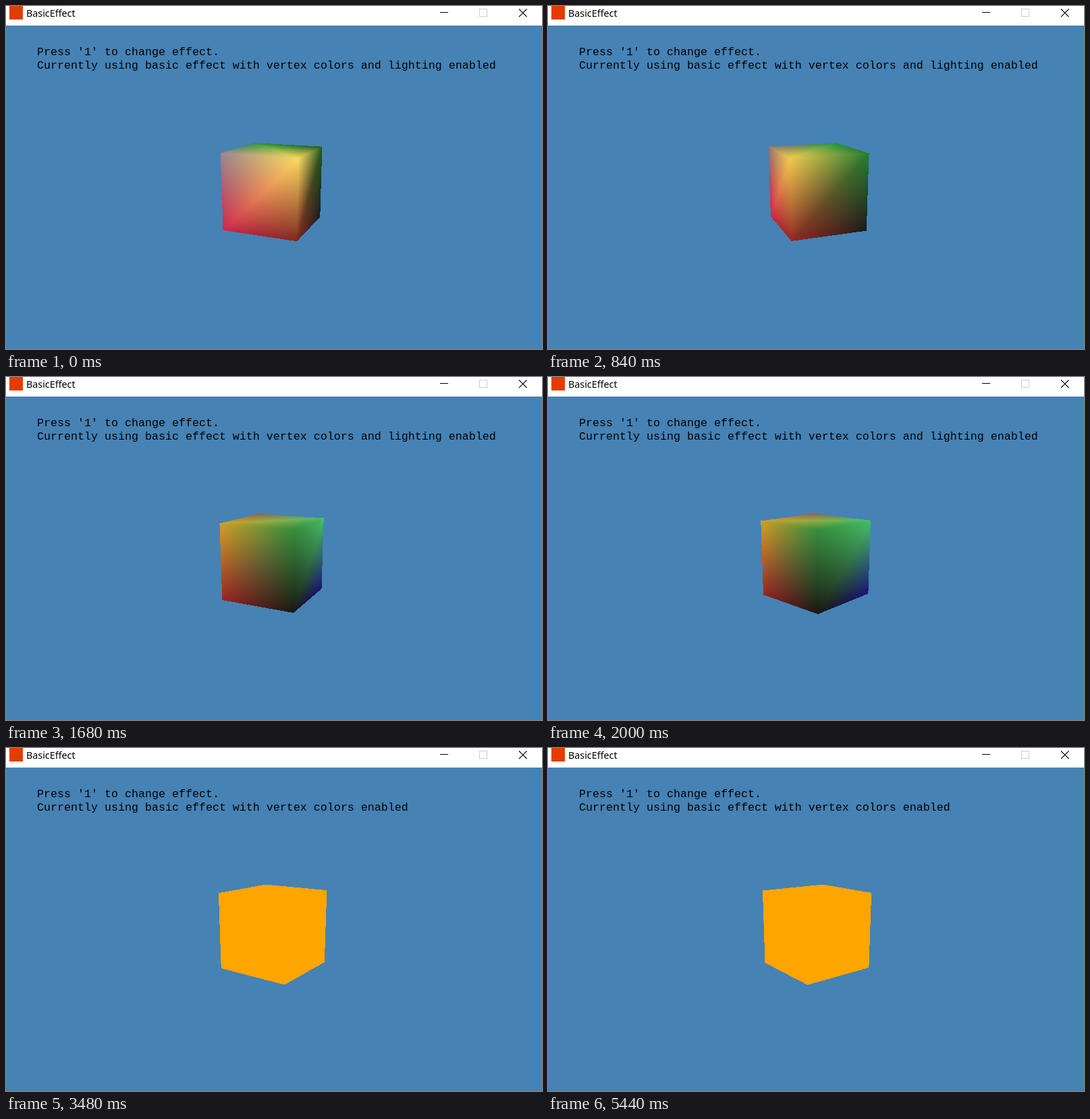
An HTML page with a canvas that plays this animation: 794 by 509 pixels, repeating every 5.52 s.

```html
<!DOCTYPE html>
<html lang="en">
<head>
<meta charset="utf-8">
<title>BasicEffect</title>
<style>
  html, body { margin: 0; width: 100%; height: 100%; overflow: hidden; background: #4682b4; }
  canvas, svg { position: absolute; left: 0; top: 0; display: block; }
  .title { font: 14.3px "Segoe UI", "Open Sans", "Noto Sans", sans-serif; }
  .hud { font: 16.67px "Courier New", "Liberation Mono", monospace; white-space: pre; }
</style>
</head>
<body>
<canvas id="scene" width="794" height="509"></canvas>
<svg width="794" height="509" viewBox="0 0 794 509">
  <rect width="794" height="29" fill="#fff"/>
  <rect x="5" y="0" width="20" height="20" fill="#e43c00"/>
  <text class="title" x="30" y="16">BasicEffect</text>
  <g fill="none" stroke="#000">
    <path d="M643 9.5h12"/>
    <rect x="701.5" y="4.5" width="11" height="11" stroke="#ccc"/>
    <path d="M760 4.500l11.500 11.500M771.500 4.500l-11.500 11.500" stroke-width="1.1"/>
  </g>
  <text class="hud" x="46" y="73">Press '1' to change effect.</text>
  <text class="hud" x="46" y="93" id="status"></text>
</svg>
<script>
const LOOP = 5520, STEPS = 71, UNLIT_STEP = 27;
const BACKGROUND = [70, 130, 180], ORANGE = [255, 165, 0];
const BOX = { x: 308, y: 198, w: 178, h: 158 };

// Camera at (0, 2.5, 10) looking at the origin, 45 degree field of view.
const DIST = Math.hypot(2.5, 10), SIN = 2.5 / DIST, COS = 10 / DIST;
const FOCAL = 240 / Math.tan(Math.PI / 8), CX = 397, CY = 269;

const ctx = document.getElementById('scene').getContext('2d');
const image = ctx.createImageData(BOX.w, BOX.h);
const status = document.getElementById('status');

// Heading of the first corner, in degrees, by step.
const HEADING = [[0, 22.65], [7, -7.6], [16, -45.4], [22, -71], [32, -114.2], [45, -170], [70, -278.1]];

// Lit corner colours at LIGHT_STEPS; four top corners, then four bottom ones.
const LIGHT_STEPS = [0, 7, 16, 22];
const LIT = [
  'fad75f ffda5f dab43a d2a028', '1e5a1e 236a23 28963e 378c3c',
  '23963c 1e963c 1e963c 46be69', '968790 968284 96645a 965f46',
  '7d2820 87261e 9b2d28 9b2423', '1c1c1c 1a1a18 1e1816 191812',
  '14106e 14106e 14106e 191478', 'cd284b d72346 c82346 be2346'
].map(row => row.split(' ').map(hex => [0, 2, 4].map(i => parseInt(hex.slice(i, i + 2), 16))));

const TRIANGLES = [[0, 1, 2], [0, 2, 3]];
for (let i = 0; i < 4; i++) {
  const j = (i + 1) % 4;
  TRIANGLES.push([i, i + 4, j], [j, i + 4, j + 4]);
}

const mix = (a, b, t) => a + (b - a) * t;

function stepTime(k) {
  const i = k % 15;
  const late = (k >= 53 && k <= 56) || k >= 68;
  return 1160 * Math.floor(k / 15) + 80 * i - (i > 5 ? 40 : 0) + (late ? 40 : 0);
}

function stepAt(ms) {
  let k = 0;
  while (k + 1 < STEPS && stepTime(k + 1) <= ms) k++;
  return k;
}

function locate(steps, k) {
  let i = 0;
  while (i < steps.length - 2 && steps[i + 1] <= k) i++;
  return [i, Math.min(1, (k - steps[i]) / (steps[i + 1] - steps[i]))];
}

function heading(k) {
  const [i, t] = locate(HEADING.map(key => key[0]), k);
  return mix(HEADING[i][1], HEADING[i + 1][1], t) * Math.PI / 180;
}

function cornerColor(n, k) {
  if (k >= UNLIT_STEP) return ORANGE;
  const [i, t] = locate(LIGHT_STEPS, k);
  return LIT[n][i].map((c, ch) => mix(c, LIT[n][i + 1][ch], t));
}

function corner(n, k) {
  const angle = heading(k) + (n % 4) * Math.PI / 2;
  const x = Math.SQRT2 * Math.sin(angle), z = Math.SQRT2 * Math.cos(angle), y = n < 4 ? 1 : -1;
  const depth = DIST - z * COS - y * SIN;
  return {
    x: CX + FOCAL * x / depth - BOX.x,
    y: CY - FOCAL * (y * COS - z * SIN) / depth - BOX.y,
    w: 1 / depth,
    color: cornerColor(n, k)
  };
}

const edge = (a, b, x, y) => (b.x - a.x) * (y - a.y) - (b.y - a.y) * (x - a.x);

function putPixel(x, y, rgb) {
  const o = (y * BOX.w + x) * 4;
  for (let ch = 0; ch < 3; ch++) image.data[o + ch] = rgb[ch];
  image.data[o + 3] = 255;
}

function fillTriangle(a, b, c) {
  if (edge(a, b, c.x, c.y) >= 0) return; // facing away
  const range = key => {
    const v = [a[key], b[key], c[key]];
    return [Math.floor(Math.min(...v)), Math.ceil(Math.max(...v))];
  };
  const [x0, x1] = range('x'), [y0, y1] = range('y');
  for (let y = y0; y < y1; y++) {
    for (let x = x0; x < x1; x++) {
      const px = x + 0.5, py = y + 0.5;
      let u = -edge(b, c, px, py), v = -edge(c, a, px, py), w = -edge(a, b, px, py);
      if (u < 0 || v < 0 || w < 0) continue;
      u *= a.w; v *= b.w; w *= c.w;
      const sum = u + v + w;
      putPixel(x, y, a.color.map((p, ch) => (p * u + b.color[ch] * v + c.color[ch] * w) / sum));
    }
  }
}

function draw(k) {
  for (let y = 0; y < BOX.h; y++)
    for (let x = 0; x < BOX.w; x++) putPixel(x, y, BACKGROUND);
  const corners = LIT.map((_, n) => corner(n, k));
  // Corners run counter-clockwise seen from outside.
  for (const [a, b, c] of TRIANGLES) fillTriangle(corners[a], corners[b], corners[c]);
  ctx.putImageData(image, BOX.x, BOX.y);
  status.textContent = 'Currently using basic effect with vertex colors ' +
    (k < UNLIT_STEP ? 'and lighting enabled' : 'enabled');
}

ctx.fillStyle = '#4682b4';
ctx.fillRect(0, 0, 794, 509);
const start = performance.now();
let shown = -1;
function tick() {
  const k = stepAt((performance.now() - start) % LOOP);
  if (k !== shown) draw(shown = k);
  requestAnimationFrame(tick);
}
tick();
</script>
</body>
</html>
```
